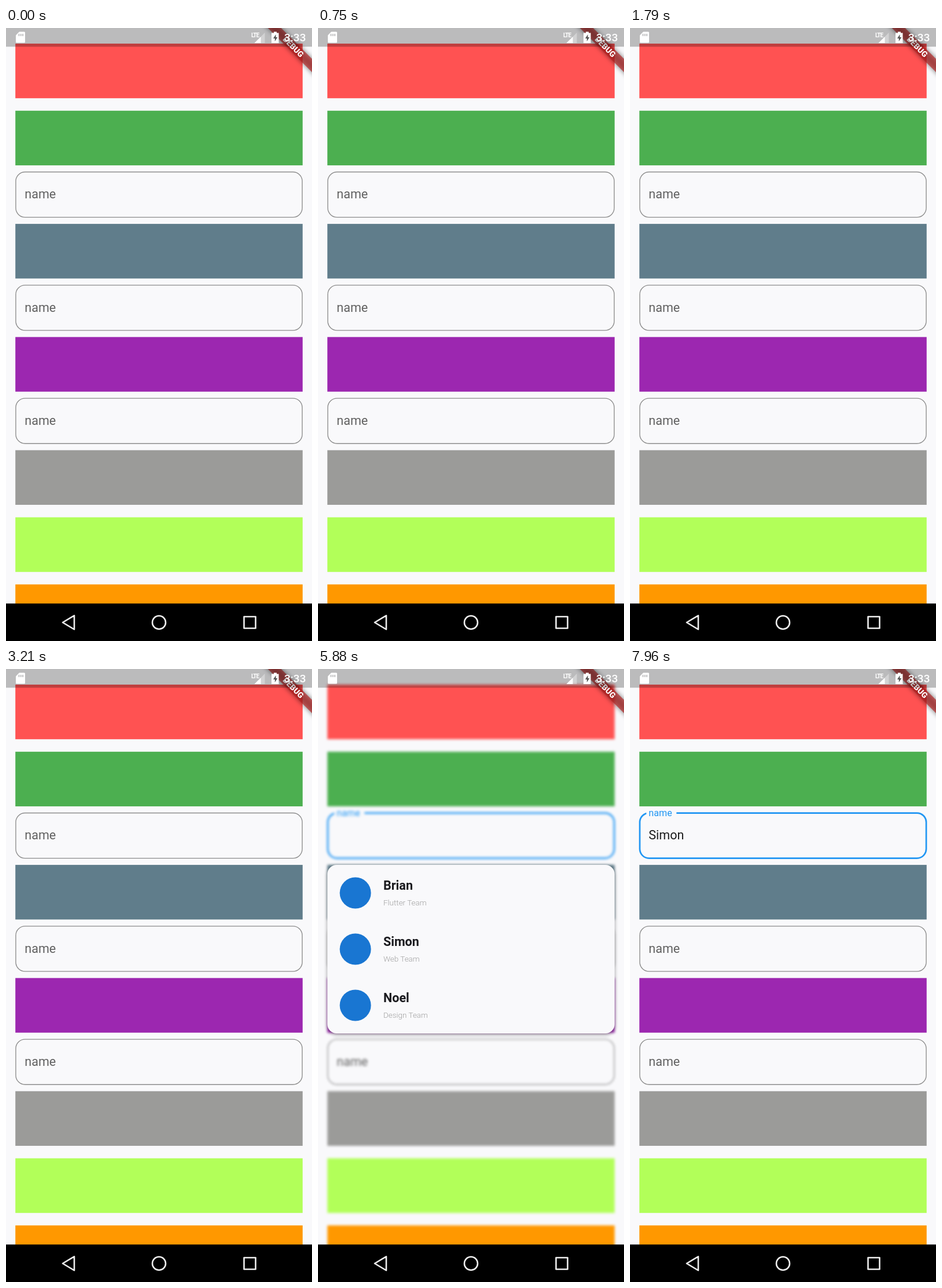
Animation, 529 px wide and 1058 px high, one loop 8 s. Source, as an HTML page:

```html
<!DOCTYPE html>
<html lang="en">
<head>
<meta charset="utf-8">
<title>Form with suggestion overlay</title>
<style>
  html, body { margin: 0; width: 100%; height: 100%; overflow: hidden; background: #f9f9fb; }
  svg { display: block; width: 529px; height: 1058px; font-family: Roboto, sans-serif; }
  #panel { filter: drop-shadow(0 2px 3px rgba(0, 0, 0, .4)); }
</style>
</head>
<body>
<svg viewBox="0 0 529 1058">
  <g id="page"></g>
  <g id="panel"><rect x="16.2" y="338" width="496.6" height="291" rx="16" fill="#f9f9fb"/></g>

  <g transform="translate(529 0) rotate(45)">
    <rect x="-80" y="37.7" width="160" height="16.2" style="filter:blur(4px)" opacity=".5"/>
    <rect x="-80" y="37.7" width="160" height="16.2" fill="#b71c1c" opacity=".63"/>
    <text y="50.6" font-size="13.74" font-weight="900" fill="#fff" text-anchor="middle">DEBUG</text>
  </g>

  <rect width="529" height="32.3" opacity=".25"/>
  <g fill="#fff">
    <path d="M23 6.5h8.500q1.500 0 1.500 1.500v16q0 1.500-1.500 1.500h-13q-1.500 0-1.500-1.500v-11.500z"/>
    <path d="M22.500 10v4M25.800 10v4M29.100 10v4" stroke="#b8b8bb" stroke-width="1.700"/>
    <text x="424" y="16" font-size="10" font-weight="700" textLength="13" lengthAdjust="spacing" letter-spacing="-1">LTE</text>
    <path d="M447.500 8v18h-18z" opacity=".35"/>
    <path d="M440.500 15v11h-11z"/>
    <path d="M463 6.500h5v2h3.500v17.500h-12.500v-17.500h4z"/>
    <path d="M466.500 11l-4.500 7h2.800v5l4.500-7h-2.800z" fill="#555"/>
    <text x="481" y="23.300" font-size="19" font-weight="500">3:33</text>
  </g>

  <rect y="993.3" width="529" height="65"/>
  <g fill="none" stroke="#eee" stroke-width="2.6" stroke-linejoin="round">
    <path d="M98 1026l20-12v24z"/>
    <circle cx="264.5" cy="1026" r="11.500"/>
    <rect x="411.500" y="1016" width="20" height="20"/>
  </g>
</svg>
<script>
const LOOP = 8000, DP = 529 / 392.75, LEFT = 16.2, WIDTH = 496.6;
const page = document.getElementById('page'), panel = document.getElementById('panel');

function add(parent, tag, attrs, text = '') {
  const el = document.createElementNS('http://www.w3.org/2000/svg', tag);
  set(el, attrs);
  el.textContent = text;
  return parent.appendChild(el);
}
function set(el, attrs) {
  for (const key in attrs) el.setAttribute(key, attrs[key]);
}
const mix = (a, b, p) => a + (b - a) * p;
const mixColor = (a, b, p) => `rgb(${a.map((v, i) => mix(v, b[i], p))})`;
const ease = p => p * p * (3 - 2 * p);
const progress = (t, start, length) => ease(Math.min(1, Math.max(0, (t - start) / length)));

const GREY = [140, 140, 140], LABEL = [97, 97, 97], BLUE = [33, 150, 243];

// Blocks are 70dp tall, fields 59dp; positions are in dp from the top.
const blocks = [[20, '#ff5252'], [106, '#4caf50'], [251, '#607d8b'], [396, '#9c27b0'],
                [541, '#9b9b99'], [627, '#b2ff59'], [713, '#ff9800']];
for (const [y, fill] of blocks)
  add(page, 'rect', { x: LEFT, y: y * DP, width: WIDTH, height: 70 * DP, fill });

const fields = [184, 329, 474].map(dp => {
  const y = dp * DP;
  const border = add(page, 'rect', { x: LEFT + .7, y: y + .7, width: WIDTH - 1.4, height: 59 * DP - 1.4,
    rx: 16, fill: 'none', stroke: mixColor(GREY, GREY, 0), 'stroke-width': DP });
  const gap = add(page, 'rect', { y: y - 3, height: 7, fill: '#f9f9fb', width: 0 });
  const label = add(page, 'text', { x: 32.3, y: y + 46.6, 'font-size': 16 * DP, fill: mixColor(LABEL, LABEL, 0) }, 'name');
  return { y, border, gap, label };
});
const [first] = fields;
const value = add(page, 'text', { x: 32.3, y: first.y + 45.8, 'font-size': 16 * DP, fill: '#1c1c1c' }, 'Simon');

[['Brian', 'Flutter Team'], ['Simon', 'Web Team'], ['Noel', 'Design Team']].forEach(([name, team], i) => {
  const y = 338 + i * 72 * DP;
  add(panel, 'circle', { cx: 64.6, cy: y + 48.5, r: 27, fill: '#1976d2' });
  add(panel, 'text', { x: 113, y: y + 43.2, 'font-size': 16 * DP, 'font-weight': 700, fill: '#1a1a1e' }, name);
  add(panel, 'text', { x: 113, y: y + 69.7, 'font-size': 10 * DP, 'font-weight': 300, fill: '#a0a0a0' }, team);
});

function draw(t) {
  const focus = progress(t, 3230, 200);
  const overlay = progress(t, 3250, 320) * (1 - progress(t, 7400, 320));

  set(first.border, { stroke: mixColor(GREY, BLUE, focus), 'stroke-width': mix(1, 2, focus) * DP });
  set(first.gap, { x: mix(54, 28.3, focus), width: 52 * focus });
  set(first.label, { y: first.y + mix(46.6, 5.8, focus), 'font-size': mix(16, 12, focus) * DP,
    fill: mixColor(LABEL, BLUE, focus) });
  set(value, { opacity: t >= 7400 ? 1 : 0 });

  page.style.filter = overlay ? `blur(${2 * overlay}px)` : 'none';
  panel.style.opacity = overlay;
}
function tick() {
  draw(performance.now() % LOOP);
  requestAnimationFrame(tick);
}
tick();
</script>
</body>
</html>
```
